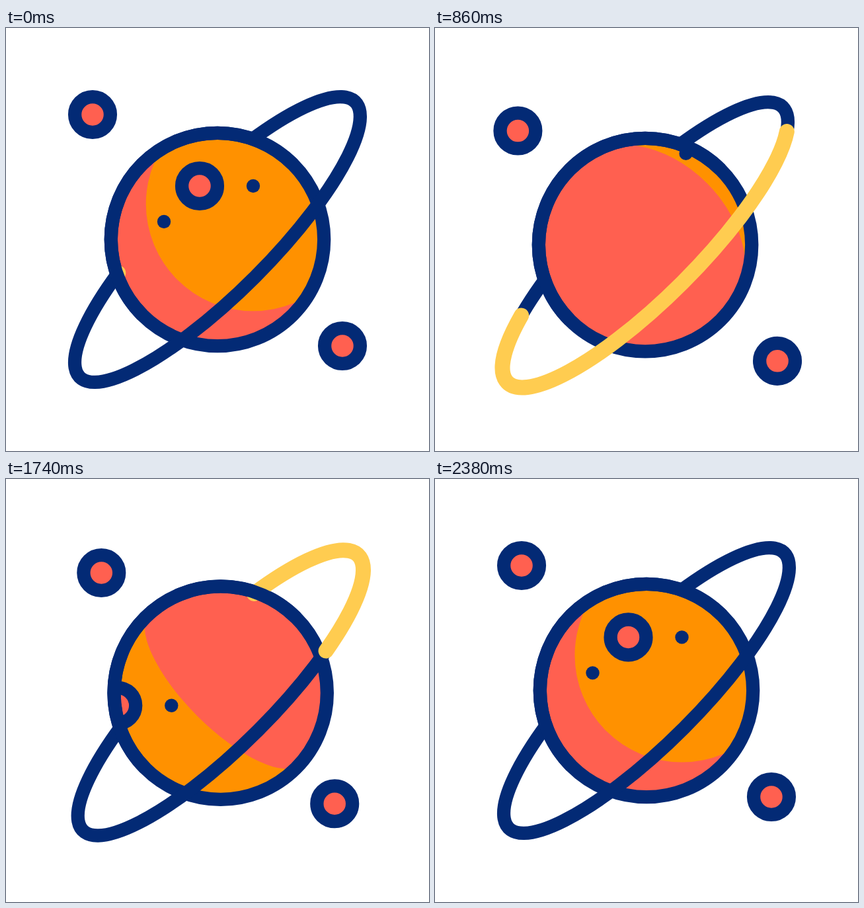
An HTML page that plays this animation: 640 by 640 pixels, repeating every 2400 ms.

```html
<!DOCTYPE html>
<html lang="en">
<head>
<meta charset="utf-8">
<title>Ringed planet</title>
<style>
  html, body { margin: 0; width: 100%; height: 100%; overflow: hidden; background: #fff; }
  svg { display: block; width: 100%; height: 100%; }
  .line { fill: none; stroke: #032a75; stroke-width: 20.3; }
  .spot { fill: #ff6050; stroke: #032a75; stroke-width: 20.3; }
  .dot { fill: #032a75; }
  .red { fill: #ff6050; }
  .orange { fill: #ff9100; }
  #glow { fill: none; stroke: #ffcc50; stroke-width: 23; stroke-linecap: round; }
</style>
</head>
<body>
<svg viewBox="-320 -320 640 640">
  <defs>
    <clipPath id="disc"><circle r="161"/></clipPath>
    <clipPath id="back"><rect x="-400" y="-400" width="800" height="400"/></clipPath>
  </defs>
  <g id="planet">
    <g clip-path="url(#disc)">
      <circle class="red" r="161"/>
      <g transform="rotate(-45)">
        <path id="day" class="orange"/>
        <path id="night" class="red"/>
      </g>
      <g id="craters">
        <circle class="spot" r="26.9"/>
        <circle class="dot" cx="81" r="10.2"/>
        <circle class="dot" cx="-54" cy="54" r="10.2"/>
      </g>
    </g>
    <circle class="line" r="161.2"/>
    <g transform="rotate(-45)">
      <path class="line" d="M-142-70.4A294.6 80.3 0 1 0 142-70.4"/>
      <path id="glow" pathLength="1000" d="M-142-70.4A294.6 80.3 0 1 0 142-70.4"/>
      <!-- the far rim covers the ends of the ring -->
      <circle class="line" r="161.2" clip-path="url(#back)"/>
    </g>
  </g>
  <circle id="moonA" class="spot" cx="-189" cy="-189" r="26.9"/>
  <circle id="moonB" class="spot" cx="189" cy="161" r="26.9"/>
</svg>
<script>
const LOOP = 2400, WRAP = 1250, R = 162;
const $ = id => document.getElementById(id);
const clamp = (v, lo, hi) => Math.min(hi, Math.max(lo, v));

// Key points of the floating loop: [time, x, y]
const orbit = [[0, 0, 0], [440, -17, 8.3], [1000, -1, 26.7], [1600, 14.5, 14], [LOOP, 0, 0]];

// Tangent at a key point, flat at the ends and at extremes
function slope(i, k) {
  const a = orbit[i - 1], b = orbit[i], c = orbit[i + 1];
  if (!a || !c || (b[k] - a[k]) * (c[k] - b[k]) <= 0) return 0;
  return (c[k] - a[k]) / (c[0] - a[0]);
}

function float(t) {
  const i = orbit.findIndex(p => p[0] > t) - 1;
  const p = orbit[i], q = orbit[i + 1], span = q[0] - p[0], u = (t - p[0]) / span;
  return [1, 2].map(k => p[k] + (q[k] - p[k]) * u * u * (3 - 2 * u)
    + span * u * (1 - u) * (slope(i, k) * (1 - u) - slope(i + 1, k) * u));
}

// Surface travel, at rest at time 0
const glide = t => (t < 0 ? -122.6 : 89.5) * Math.abs(t / 640) ** 1.57;

const move = (id, x, y) => $(id).setAttribute('transform', `translate(${x} ${y})`);

// Everything to the right of a curved edge
function edge(id, bulge, x) {
  const sweep = bulge < 0 ? 1 : 0;
  $(id).setAttribute('d',
    `M${x} ${-R}A${Math.abs(bulge)} ${R} 0 0 ${sweep} ${x} ${R}H400V${-R}Z`);
}

function draw(now) {
  const t = now % LOOP;
  const early = t > WRAP ? t - LOOP : t, late = t < WRAP ? t + LOOP : t;

  const [x, y] = float(t);
  move('planet', x * .35, y * .33);
  move('moonA', x, y);
  move('moonB', y * .14 - x, y * .93);

  const g = glide(early);
  move('craters', g - 27, -81 - g * .78);

  const fade = early < 0 ? 0 : Math.min(2, (early / 640) ** 1.85);
  edge('day', R * (1 - fade), Math.max(0, 76 + Math.min(0, g) * .8) - 36 * fade);
  const dawn = clamp((late - 1500) / 520, 0, 1) ** 1.5;
  edge('night', R * (1 - 2 * dawn), 47 * dawn * (1 - dawn));

  const head = Math.min(1000, t / 1.1), tail = Math.max(0, (t - 760) / 1.487);
  const len = Math.max(0, head - tail), glow = $('glow');
  glow.style.visibility = len > 0 ? 'visible' : 'hidden';
  glow.setAttribute('stroke-dasharray', `${len} 3000`);
  glow.setAttribute('stroke-dashoffset', -tail);
}

const start = performance.now();
function tick() {
  draw(performance.now() - start);
  requestAnimationFrame(tick);
}
tick();
</script>
</body>
</html>
```
